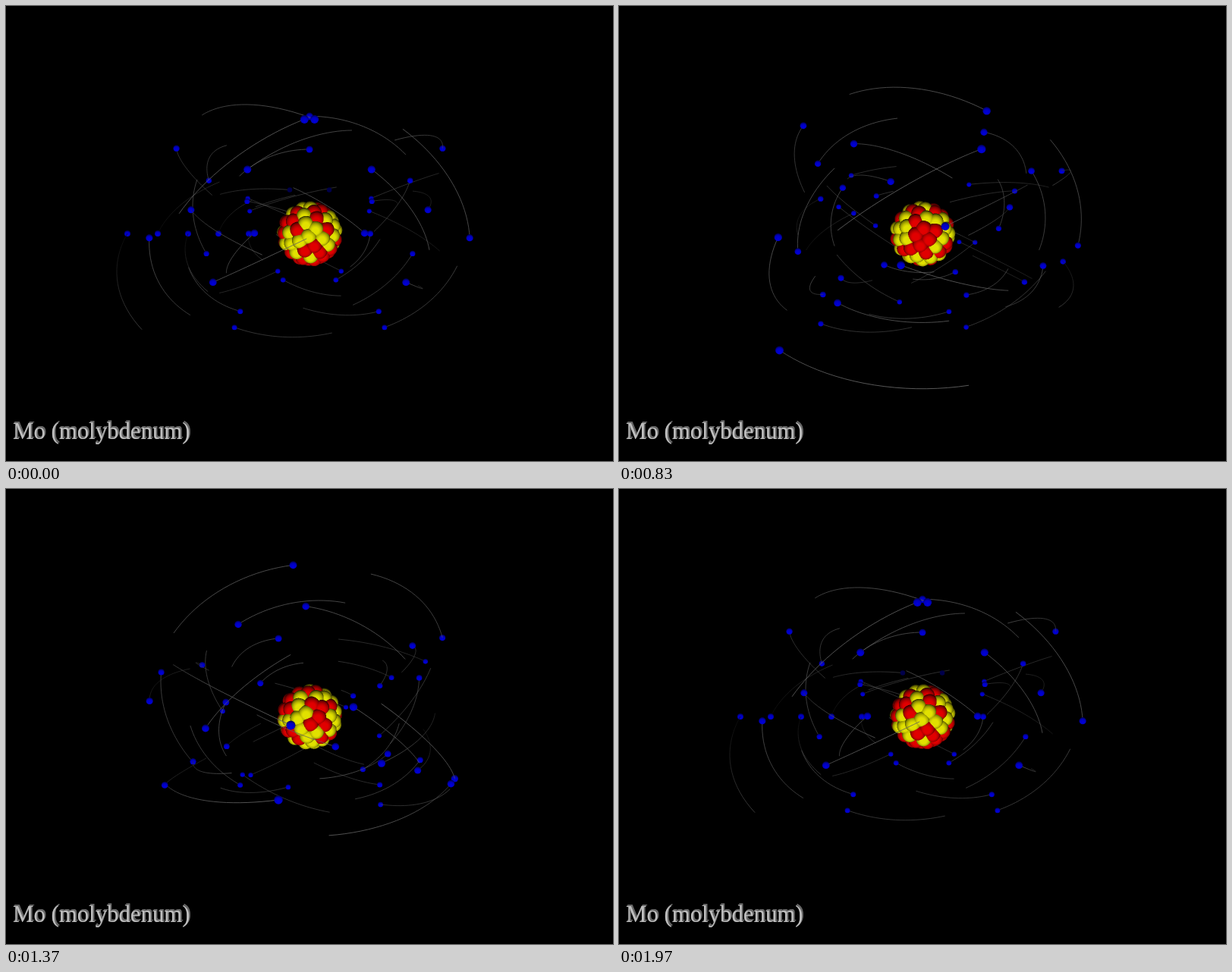
Write an HTML page with a canvas that moves like this. It is 800 px wide and 600 px high and loops after 2000 ms.

```html
<!DOCTYPE html>
<html lang="en">
<head>
<meta charset="utf-8">
<title>Mo (molybdenum)</title>
<style>
html, body { margin: 0; height: 100%; overflow: hidden; background: #000; }
canvas { display: block; }
</style>
</head>
<body>
<canvas id="stage" width="800" height="600"></canvas>
<script>
const ctx = document.getElementById('stage').getContext('2d');
const { sin, cos, sqrt, hypot, floor, ceil, min, max, PI } = Math;
const TAU = 2 * PI;
const CAMERA = 600;
const TILT = 35 * PI / 180, ST = sin(TILT), CT = cos(TILT);
const CORE = 43;

// Electron count and starting phase step (in parts of 360/count) for each shell.
const shells = [[2, .5], [8, 3], [18, 5], [13, 2], [1, 0]];

function project([x, y, z]) {
  const up = y * CT - z * ST, near = y * ST + z * CT;
  const s = CAMERA / (CAMERA - near);
  return { x: 400 + x * s, y: 300 - up * s, z: near, s };
}

const spin = ([x, y, z], a) => [x * cos(a) - z * sin(a), y, z * cos(a) + x * sin(a)];

// A circle in the xz plane, turned by the same angle about x and then z.
function orbit(r, phase, turn) {
  const s = sin(turn), c = cos(turn);
  const a = -cos(phase) * r, q = sin(phase) * r;
  return [a * c - s * s * q, a * s + s * c * q, c * q];
}

// The light shines along the world z axis, so the nucleus shades what is behind it.
const shaded = ([x, y, z]) => z < 0 && hypot(x, y) < CORE;

function trail(items, pointAt, dir) {
  const steps = 20;
  let prev = pointAt(0);
  for (let i = 1; i <= steps; i++) {
    const next = pointAt(-dir * i / steps * PI / 4);
    const d = next.map((v, j) => v - prev[j]);
    const across = hypot(d[0], d[1]) / hypot(...d);
    if (!shaded(next)) {
      const a = project(prev), b = project(next);
      const g = floor(15 + 85 * across);
      items.push({ z: b.z, draw() {
        ctx.strokeStyle = `rgb(${g},${g},${g})`;
        ctx.lineWidth = .6 * b.s;
        ctx.beginPath();
        ctx.moveTo(a.x, a.y);
        ctx.lineTo(b.x, b.y);
        ctx.stroke();
      } });
    }
    prev = next;
  }
}

function electron(items, pos) {
  const { x, y, z, s } = project(pos);
  const r = 4 * s, dark = shaded(pos);
  items.push({ z: z + 5, draw() {
    const g = ctx.createRadialGradient(x, y + r * .4, 0, x, y + r * .4, 1.4 * r);
    g.addColorStop(0, dark ? '#00004b' : '#0000dc');
    g.addColorStop(.6, dark ? '#00004b' : '#0000be');
    g.addColorStop(1, '#000046');
    ctx.fillStyle = g;
    ctx.beginPath();
    ctx.arc(x, y, r, 0, TAU);
    ctx.fill();
  } });
}

let seed = 42;
const random = () => (seed = seed * 16807 % 2147483647) / 2147483647;

// Nucleons are spread evenly over a sphere; 42 of 96 are protons.
const COUNT = 78;
const nucleons = Array.from({ length: COUNT }, (_, i) => {
  const y = 1 - (2 * i + 1) / COUNT, r = sqrt(1 - y * y), a = i * PI * (3 - sqrt(5));
  return { dir: [r * cos(a), y, r * sin(a)], red: random() < 42 / 96 };
});

// The nucleus is drawn at double size with a depth buffer, so the balls intersect cleanly.
const SIZE = 192;
const core = document.createElement('canvas');
core.width = core.height = SIZE;
const coreCtx = core.getContext('2d');

function drawNucleus(angle) {
  const image = coreCtx.createImageData(SIZE, SIZE);
  const depth = new Float32Array(SIZE * SIZE).fill(-1e3);
  for (const n of nucleons) {
    const p = project(spin(n.dir.map(v => v * 33.4), angle));
    if (p.z < -15) continue;
    const cx = (p.x - 352) * 2, cy = (p.y - 252) * 2, r = 20 * p.s;
    for (let y = ceil(cy - r); y <= cy + r; y++) {
      for (let x = ceil(cx - r); x <= cx + r; x++) {
        const u = (x - cx) / r, v = (y - cy) / r, h = 1 - u * u - v * v;
        if (h < 0) continue;
        const w = sqrt(h), z = p.z + w * 10, at = y * SIZE + x;
        if (z <= depth[at]) continue;
        depth[at] = z;
        const light = min(225, 40 + 205 * max(0, v * .3 + w * .95));
        image.data.set([light, n.red ? 0 : light, 0, 255], at * 4);
      }
    }
  }
  coreCtx.putImageData(image, 0, 0);
  ctx.drawImage(core, 352, 252, SIZE / 2, SIZE / 2);
}

function drawLabel() {
  ctx.font = '30.8px "Liberation Serif", "Times New Roman", serif';
  const put = (color, d) => {
    ctx.fillStyle = color;
    ctx.fillText('Mo (molybdenum)', 9 + d, 570.5 - d);
  };
  for (let d = 1.8; d > 0; d -= .6) put('#666', d);
  put('#bebebe', 0);
}

function render(ms) {
  const k = floor((floor(ms % 2000 / 10) + .5) * .3);
  const turn = TAU * k / 59;
  const items = [{ z: 0, draw: () => drawNucleus(turn) }];
  shells.forEach(([count, step], shell) => {
    const r = 80 + 40 * shell, dir = shell % 2 ? 1 : -1;
    for (let i = 0; i < count; i++) {
      const phase = -step * TAU * i / count + dir * 2 * turn;
      const pointAt = d => orbit(r, phase + d, PI * i / count);
      trail(items, pointAt, dir);
      electron(items, pointAt(0));
    }
  });
  ctx.fillStyle = '#000';
  ctx.fillRect(0, 0, 800, 600);
  items.sort((a, b) => a.z - b.z).forEach(item => item.draw());
  drawLabel();
}

const start = performance.now();
function tick() {
  render(performance.now() - start);
  requestAnimationFrame(tick);
}
tick();
</script>
</body>
</html>
```
